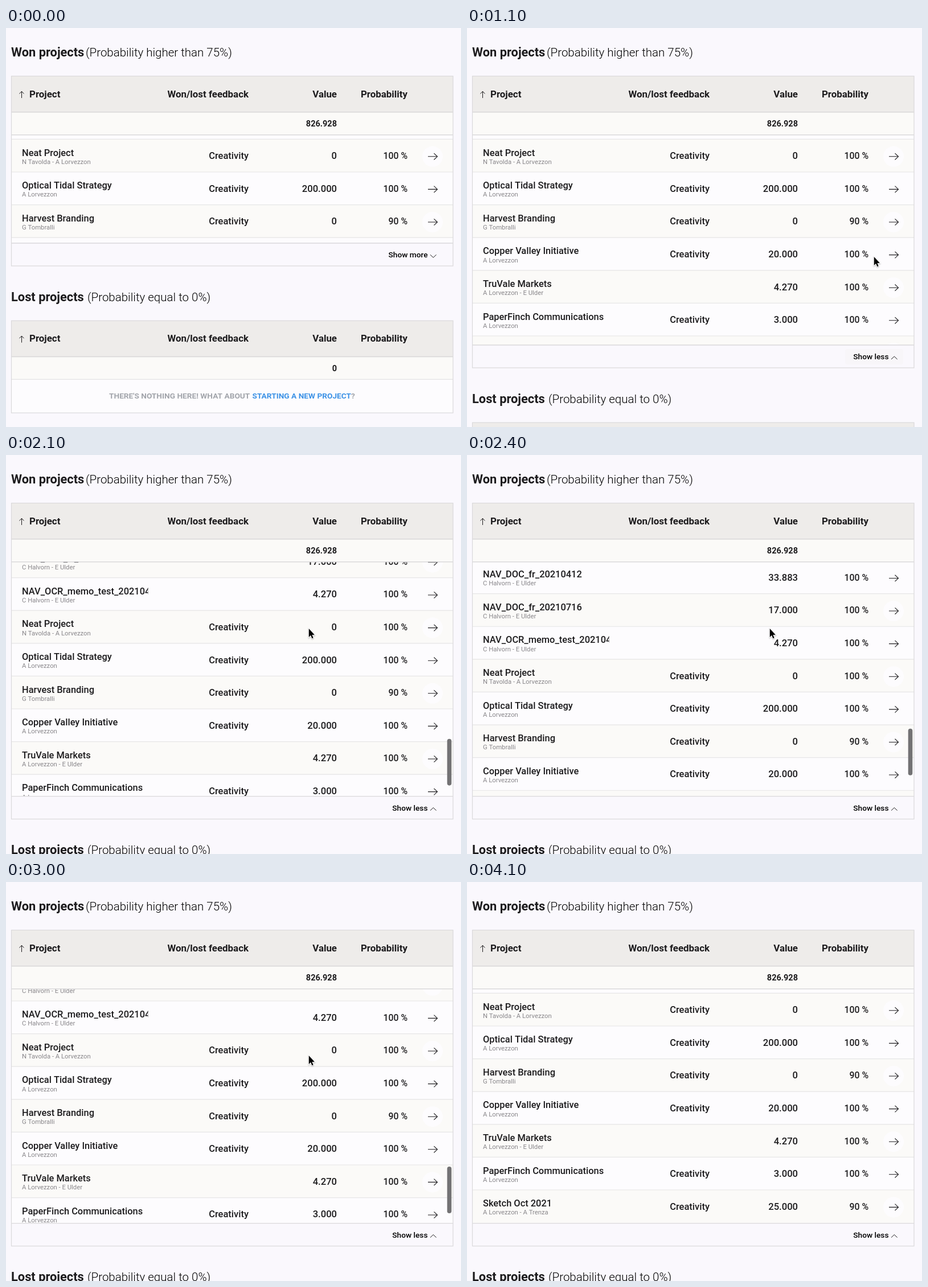
Recreate the animation shown at these times as an HTML page with a canvas. Size 799 by 701 pixels, loop 4600 ms.

```html
<!DOCTYPE html>
<html lang="en">
<head>
<meta charset="utf-8">
<title>Project lists</title>
<style>
  html, body { margin: 0; width: 100%; height: 100%; overflow: hidden; background: #faf8fd; }
  canvas { display: block; width: 799px; height: 701px; }
</style>
</head>
<body>
<canvas id="stage"></canvas>
<script>
const W = 799, H = 701, LOOP = 4600, STEP = 100;
const LEFT = 9.5, RIGHT = 785, LIST_TOP = 188, ROW_H = 57.6, FIRST_ROW = 195.4;
const CLOSED = 378, OPEN = 599.6;
const PAGE = '#faf8fd', LIGHT = '#fdfcfe', CREAM = '#fbfaf8', HEAD = '#eeecea';
const EDGE = '#dad9db', RULE = '#e6e5e6', INK = '#1c1b1d', MUTED = '#88868a';

// Row index 0 sits at the top of the resting list; earlier rows are negative.
const FIRST_INDEX = -4;
const ROWS = [
  ['NAV_DOC_MAP_02_20210716', 'A Lorvezzon - E Ulder', '', '17.000', 100],
  ['NAV_DOC_fr_20210412', 'C Halvorn - E Ulder', '', '33.883', 100],
  ['NAV_DOC_fr_20210716', 'C Halvorn - E Ulder', '', '17.000', 100],
  ['NAV_OCR_memo_test_202104', 'C Halvorn - E Ulder', '', '4.270', 100],
  ['Neat Project', 'N Tavolda - A Lorvezzon', 'Creativity', '0', 100],
  ['Optical Tidal Strategy', 'A Lorvezzon', 'Creativity', '200.000', 100],
  ['Harvest Branding', 'G Tombralli', 'Creativity', '0', 90],
  ['Copper Valley Initiative', 'A Lorvezzon', 'Creativity', '20.000', 100],
  ['TruVale Markets', 'A Lorvezzon - E Ulder', '', '4.270', 100],
  ['PaperFinch Communications', 'A Lorvezzon', 'Creativity', '3.000', 100],
  ['Sketch Oct 2021', 'A Lorvezzon - A Trenza', 'Creativity', '25.000', 90]
];

// Keyframes: [time, ...values]
const BOTTOM = [[800, CLOSED], [900, 411], [1000, 500], [1100, 557], [1200, 584], [1300, 595], [1400, 599], [1500, OPEN]];
const SCROLL = [[1700, 0], [1800, 12.4], [2100, 77.8], [2500, 192], [2600, 210.5], [2700, 210.5],
  [2800, 168], [3000, 71.2], [3100, 28], [3200, 0]];
const POINTER = [[100, 69, 632], [200, 205, 545], [300, 425, 425], [400, 610, 345], [500, 692, 334], [600, 714, 401],
  [1100, 714, 401], [1200, 672, 376], [1300, 585, 332], [1400, 540, 311], [1500, 531, 304],
  [3700, 531, 304], [3800, 560, 262], [3900, 610, 200], [4000, 640, 166]];

const canvas = document.getElementById('stage');
const ctx = canvas.getContext('2d');
const dpr = window.devicePixelRatio || 1;
canvas.width = Math.round(W * dpr);
canvas.height = Math.round(H * dpr);

function sample(keys, t) {
  if (t <= keys[0][0]) return keys[0].slice(1);
  for (let i = 1; i < keys.length; i++) {
    const a = keys[i - 1], b = keys[i];
    if (t <= b[0]) {
      const k = (t - a[0]) / (b[0] - a[0]);
      return a.slice(1).map((v, j) => v + (b[j + 1] - v) * k);
    }
  }
  return keys[keys.length - 1].slice(1);
}

function text(str, x, y, size, weight = 400, color = INK, align = 'left') {
  ctx.font = `${weight} ${size}px Roboto, "Open Sans", sans-serif`;
  ctx.fillStyle = color;
  ctx.textAlign = align;
  ctx.fillText(str, x, y);
}

function box(x, y, w, h, color) {
  ctx.fillStyle = color;
  ctx.fillRect(x, y, w, h);
}

function path(points, color, width) {
  ctx.beginPath();
  points.forEach(([x, y], i) => i ? ctx.lineTo(x, y) : ctx.moveTo(x, y));
  ctx.strokeStyle = color;
  ctx.lineWidth = width;
  ctx.stroke();
}

function rule(y, color = EDGE, width = 1.2) {
  path([[LEFT, y], [RIGHT, y]], color, width);
}

function pill(x, y, w, h, r, color) {
  ctx.beginPath();
  ctx.roundRect(x, y, w, h, r);
  ctx.fillStyle = color;
  ctx.fill();
}

function frame(top, bottom) {
  ctx.strokeStyle = EDGE;
  ctx.lineWidth = 1.2;
  ctx.strokeRect(LEFT, top, RIGHT - LEFT, bottom - top);
}

function tableHead(title, note, noteX, total) {
  text(title, 9, 50, 21.8, 700);
  text(note, noteX, 50, 20.5, 300, '#000');
  box(LEFT, 84.5, RIGHT - LEFT, 63, HEAD);
  box(LEFT, 147.5, RIGHT - LEFT, 40, CREAM);
  path([[27.5, 123], [27.5, 111.5]], INK, 1);
  path([[23.5, 115.5], [27.5, 111.3], [31.5, 115.5]], INK, 1);
  text('Project', 41, 121.7, 16.9, 700);
  text('Won/lost feedback', 426, 121.7, 16.9, 700, INK, 'right');
  text('Value', 581, 121.7, 16.9, 700, INK, 'right');
  text('Probability', 705, 121.7, 16.9, 700, INK, 'right');
  text(total, 581, 173, 14.5, 700, INK, 'right');
  rule(147.8, '#d8d7d8', 1.5);
  rule(187.7, EDGE, 1.4);
}

function row(index, y) {
  const [name, team, feedback, value, chance] = ROWS[index - FIRST_INDEX];
  const cream = index % 2 === 0;
  box(LEFT, y, RIGHT - LEFT, ROW_H, cream ? CREAM : LIGHT);
  ctx.save();
  ctx.beginPath();
  ctx.rect(28, y, 221.5, ROW_H);
  ctx.clip();
  text(name, 28, y + 29.2, 16.4, 500);
  text(team, 28, y + 43.4, 11.3, 400, MUTED);
  ctx.restore();
  const base = y + 34.8;
  text(feedback, 426, base, 16.5, 500, INK, 'right');
  text(value, 581, base, 16.6, 500, INK, 'right');
  text(chance + ' %', 705, base, 15.8, 500, INK, 'right');
  if (cream) pill(731, y + 12.4, 36, 36, 18, LIGHT);
  const mid = y + 30.4;
  path([[741, mid], [757.3, mid]], INK, 1.1);
  path([[751.5, mid - 5.7], [757.5, mid], [751.5, mid + 5.7]], INK, 1.1);
  rule(y, RULE);
}

function list(bottom, scroll) {
  ctx.save();
  ctx.beginPath();
  ctx.rect(LEFT, LIST_TOP, RIGHT - LEFT, bottom - LIST_TOP);
  ctx.clip();
  box(LEFT, LIST_TOP, RIGHT - LEFT, bottom - LIST_TOP, LIGHT);
  for (let i = 0; i < ROWS.length; i++) {
    const index = i + FIRST_INDEX, y = FIRST_ROW + index * ROW_H + scroll;
    if (y < bottom && y + ROW_H > LIST_TOP) row(index, y);
  }
  ctx.restore();
}

function footer(y, open, hover) {
  box(LEFT, y, RIGHT - LEFT, 40, PAGE);
  if (hover) pill(664, y + 7, 102, 27, 4, '#f8f6f9');
  rule(y, EDGE, 1.4);
  text(open ? 'Show less' : 'Show more', 740.5, y + 25, 13.7, 500, '#000', 'right');
  const tip = y + (open ? 20 : 25.3), ends = y + (open ? 25 : 20.3);
  path([[745, ends], [750.3, tip], [755.6, ends]], INK, 1);
  frame(84.5, y + 40);
}

function lostTable(shift) {
  ctx.save();
  ctx.translate(0, shift);
  tableHead('Lost projects', '(Probability equal to 0%)', 143, '0');
  box(LEFT, 188, RIGHT - LEFT, 58.5, LIGHT);
  text("THERE'S NOTHING HERE! WHAT ABOUT", 181, 221.7, 13.7, 700, '#a2a5ab');
  text('STARTING A NEW PROJECT', 432.5, 221.7, 13.7, 700, '#3c92e6');
  text('?', 606, 221.7, 13.7, 700, '#a2a5ab');
  frame(84.5, 246.5);
  ctx.restore();
}

function pointer(x, y) {
  const shape = new Path2D('M0 0V15.8L3.7 12.4L6.2 18.2L8.7 17.1L6.2 11.5H11.2Z');
  ctx.save();
  ctx.translate(x + 0.8, y + 1);
  ctx.scale(0.9, 0.95);
  ctx.shadowColor = 'rgba(0,0,0,.3)';
  ctx.shadowBlur = 2 * dpr;
  ctx.shadowOffsetY = dpr;
  ctx.strokeStyle = '#fff';
  ctx.lineWidth = 2;
  ctx.stroke(shape);
  ctx.shadowColor = 'transparent';
  ctx.fillStyle = '#000';
  ctx.fill(shape);
  ctx.restore();
}

function draw(t) {
  const [bottom] = sample(BOTTOM, t), [scroll] = sample(SCROLL, t);
  ctx.setTransform(dpr, 0, 0, dpr, 0, 0);
  box(0, 0, W, H, PAGE);
  list(bottom, scroll);
  tableHead('Won projects', '(Probability higher than 75%)', 140, '826.928');
  footer(bottom, t >= 900, t >= 600 && t < 1200);
  lostTable(bottom - CLOSED + 429.7);

  if (t >= 1800 && t < 4100) {
    ctx.globalAlpha = Math.min(1, (4100 - t) / 400);
    pill(774.7, 515 - scroll * 0.21, 7.6, 82, 3.8, '#737274');
    ctx.globalAlpha = 1;
  }
  if (t >= 100 && t < 4100) pointer(...sample(POINTER, t));
}

const start = performance.now();
function tick() {
  const t = (performance.now() - start) % LOOP;
  draw(Math.floor(t / STEP) * STEP);
  requestAnimationFrame(tick);
}
tick();
</script>
</body>
</html>
```
